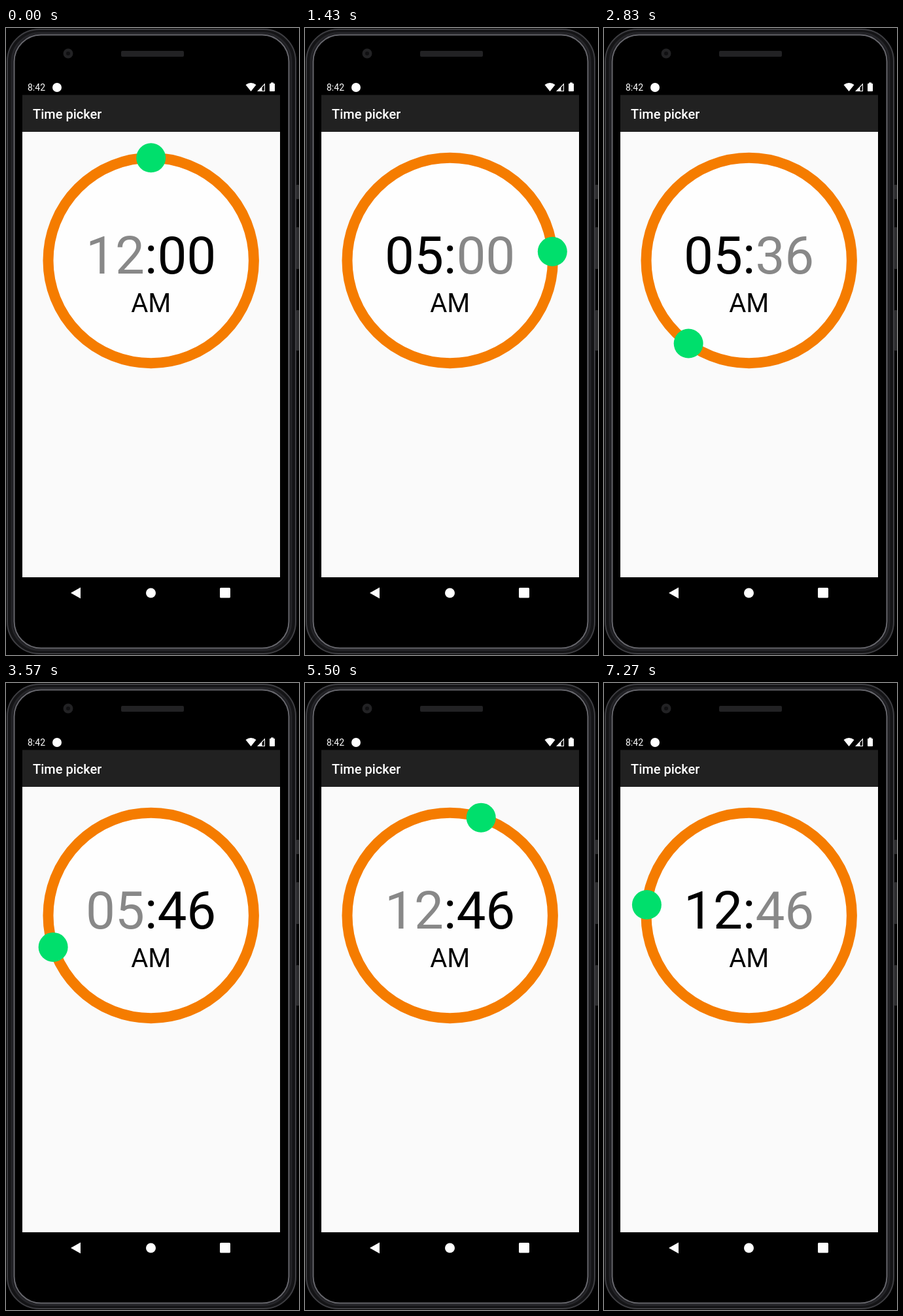
Recreate the animation shown at these times as an HTML page with a canvas. Size 448 by 960 pixels, loop 8 s.

```html
<!DOCTYPE html>
<html lang="en">
<head>
<meta charset="utf-8">
<title>Time picker</title>
<style>
  html, body { margin: 0; width: 100%; height: 100%; overflow: hidden; background: #000; }
  canvas { display: block; width: 448px; height: 960px; }
</style>
</head>
<body>
<canvas id="stage" width="448" height="960"></canvas>
<script>
const ctx = document.getElementById('stage').getContext('2d');
const LOOP = 8000;
const DIAL = { x: 221.7, y: 356, r: 157.2 };
const WHITE = '#fff';
const FADED = '#888';

// Each phase springs the knob to its rest angle, then follows drag keys [ms, degrees].
const phases = [
  { at: 0, unit: 'hour', rest: 0, keys: [[530, 0], [640, 22], [1000, 152], [1130, 172]] },
  { at: 1270, unit: 'minute', rest: 0,
    keys: [[2255, 0], [2400, 81.6], [2700, 185], [3050, 268], [3400, 279]] },
  { at: 3470, unit: 'hour', rest: 150,
    keys: [[4905, 150], [4930, 144.5], [5500, 17.6], [5730, 14], [5800, -6],
           [5955, -6], [6300, 14]] },
  { at: 6670, unit: 'minute', rest: 276, keys: [] }
];

function along(keys, t) {
  const i = keys.findIndex(k => k[0] > t);
  if (i < 0) return keys[keys.length - 1][1];
  const [t0, a0] = keys[i - 1], [t1, a1] = keys[i];
  return a0 + (a1 - a0) * (t - t0) / (t1 - t0);
}

function spring(from, to, ms) {
  const delta = ((from - to + 540) % 360) - 180;
  if (ms >= 600) return to;
  const x = 14.14 * Math.max(0, ms - 41) / 1000;
  return to + delta * (1 + x) * Math.exp(-x);
}

function stateAt(t) {
  let i = phases.length - 1;
  while (phases[i].at > t) i--;
  const { at, unit, rest, keys } = phases[i];
  const dragging = keys.length > 0 && t >= keys[0][0];
  const before = i ? phases[i - 1].keys.at(-1)[1] : rest;
  const angle = dragging ? along(keys, t) : spring(before, rest, t - at);

  const set = { hour: 0, minute: 0 };
  for (const p of phases.slice(0, i + 1)) {
    set[p.unit] = p.keys.length && t >= p.keys[0][0] ? along(p.keys, t) : p.rest;
  }
  return {
    angle, unit,
    hour: (Math.floor(set.hour / 30) + 12) % 12 || 12,
    minute: (Math.floor(set.minute / 6) + 60) % 60,
    half: set.hour < 0 ? 'PM' : 'AM'
  };
}

function rect(x, y, w, h, color, r = 0) {
  ctx.fillStyle = color;
  ctx.beginPath();
  ctx.roundRect(x, y, w, h, r);
  ctx.fill();
}

function outline(x, y, w, h, r, color, width) {
  ctx.strokeStyle = color;
  ctx.lineWidth = width;
  ctx.beginPath();
  ctx.roundRect(x, y, w, h, r);
  ctx.stroke();
}

function disc(x, y, r, color) {
  ctx.fillStyle = color;
  ctx.beginPath();
  ctx.arc(x, y, r, 0, Math.PI * 2);
  ctx.fill();
}

function poly(color, ...points) {
  ctx.fillStyle = color;
  ctx.beginPath();
  points.forEach(p => ctx.lineTo(...p));
  ctx.fill();
}

function text(str, x, y, font, color, align = 'left') {
  ctx.font = font + ' Roboto, sans-serif';
  ctx.fillStyle = color;
  ctx.textAlign = align;
  ctx.fillText(str, x, y);
}

function drawPhone() {
  rect(0, 0, 448, 960, '#000');
  for (const [y, h] of [[240, 22], [305, 64], [432, 62]]) rect(444, y, 4, h, '#2c2c2e', 1);
  rect(1, 1, 443, 958, '#141416', 50);
  outline(2, 2, 441, 956, 49, '#3e3e42', 2);
  outline(9, 7.5, 427, 945, 44, '#242428', 3);
  rect(12, 10, 421, 940, '#000', 42);
  outline(12.5, 10.5, 420, 939, 41, '#66666c', 2);
  rect(176, 35, 96, 9, '#222224', 2);
  disc(95, 39, 7.5, '#222224');
  disc(95, 39, 3, '#101012');
}

function drawStatusBar() {
  text('8:42', 33, 96, '14px', WHITE);
  disc(78, 91, 7, WHITE);

  ctx.fillStyle = WHITE;
  ctx.beginPath();
  ctx.moveTo(374.5, 97);
  ctx.lineTo(366.5, 87);
  ctx.quadraticCurveTo(374.5, 81, 382.5, 87);
  ctx.fill();

  poly(WHITE, [384, 97], [396, 84.5], [396, 97]);
  poly('#000', [391.5, 96], [391.5, 91], [395, 87.3], [395, 96]);
  rect(403, 85, 8, 12, WHITE, 1);
  rect(405, 83.5, 4, 2, WHITE);
}

function drawScreen() {
  rect(25, 102.5, 394, 56.5, '#212121');
  text('Time picker', 41, 139, '500 20px', WHITE);
  rect(25, 159, 394, 682, '#fafafa');
  poly(WHITE, [99, 865], [114, 856.5], [114, 873.5]);
  disc(221.5, 865, 7.5, WHITE);
  rect(327, 857, 16, 15.5, WHITE, 1.5);
}

function drawPicker({ angle, unit, hour, minute, half }) {
  disc(DIAL.x, DIAL.y, DIAL.r, '#fefefe');
  ctx.strokeStyle = '#f57c00';
  ctx.lineWidth = 16;
  ctx.beginPath();
  ctx.arc(DIAL.x, DIAL.y, DIAL.r, 0, Math.PI * 2);
  ctx.stroke();

  const color = u => u === unit ? FADED : '#000';
  const two = n => String(n).padStart(2, '0');
  ctx.font = '80px Roboto, sans-serif';
  const gap = ctx.measureText(':').width / 2;
  text(two(hour), DIAL.x - gap, 376, '80px', color('hour'), 'right');
  text(':', DIAL.x, 376, '80px', '#000', 'center');
  text(two(minute), DIAL.x + gap, 376, '80px', color('minute'));
  text(half, DIAL.x, 434.5, '40px', '#000', 'center');

  const a = angle * Math.PI / 180;
  disc(DIAL.x + DIAL.r * Math.sin(a), DIAL.y - DIAL.r * Math.cos(a), 22.5, '#00df6c');
}

const start = performance.now();
function frame() {
  drawPhone();
  drawStatusBar();
  drawScreen();
  drawPicker(stateAt((performance.now() - start) % LOOP));
  requestAnimationFrame(frame);
}
frame();
</script>
</body>
</html>
```
